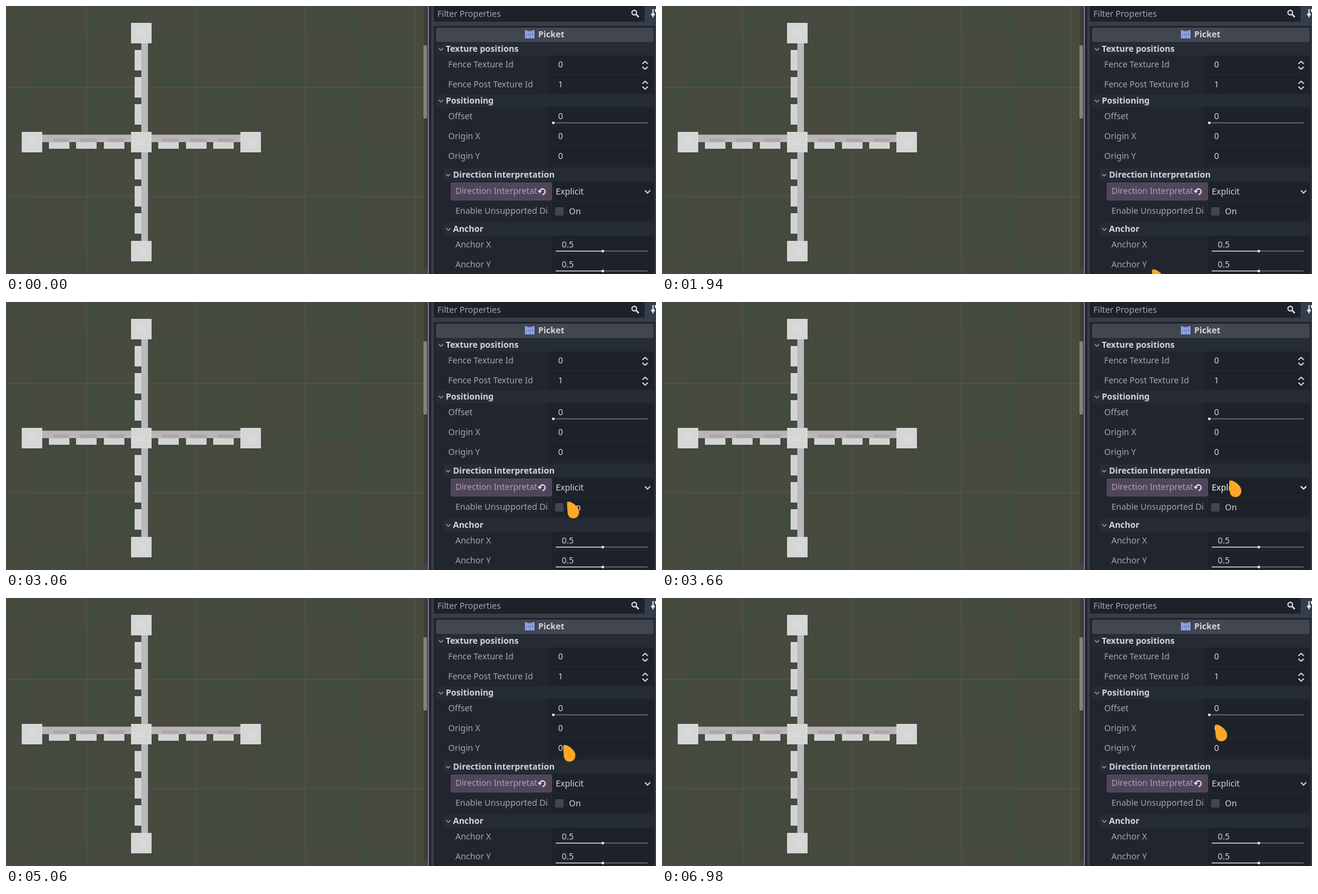
An HTML page that plays this animation: 1076 by 445 pixels, repeating every 8 s.

```html
<!DOCTYPE html>
<html lang="en">
<head>
<meta charset="utf-8">
<title>Inspector</title>
<style>
  html, body { margin: 0; width: 100%; height: 100%; overflow: hidden; background: #21262e; }
  svg { display: block; width: 1076px; height: 445px; }
  text { font: 14px "Noto Sans", sans-serif; white-space: pre; }
  .title { font-weight: 700; fill: #d3d5d8; }
  .label { fill: #a3a6aa; }
  .value { fill: #d0d2d5; }
  path { fill: none; stroke: #d0d2d5; stroke-width: 2; }
  .hover text { fill: #f6f7f8; }
  .hover path { stroke: #f6f7f8; }
</style>
</head>
<body>
<svg id="stage" viewBox="0 0 1076 445"></svg>
<script>
const rect = (x, y, w, h, fill, r = 0) =>
  `<rect x="${x}" y="${y}" width="${w}" height="${h}" rx="${r}" fill="${fill}"/>`;
const text = (x, y, s, kind) => `<text x="${x}" y="${y}" class="${kind}">${s}</text>`;
const path = (d, style = '') => `<path d="${d}" style="${style}"/>`;
const group = (id, body) => `<g id="${id}">${body}</g>`;

function ground() {
  const step = 90.5;
  let s = rect(0, 0, 698, 445, '#484a40');
  for (let i = 0; i < 8; i++)
    for (let j = 0; j < 6; j++)
      if ((i + j) % 2 === 0)
        s += rect(Math.round(i * step - 48), Math.round(j * step - 45.5), 91, 91, '#434a3e');
  for (const x of [133, 314, 495, 676]) s += rect(x, 0, 1, 445, '#55584e');
  for (const y of [135, 316]) s += rect(0, y, 698, 1, '#55584e');
  return s;
}

function fence() {
  let s = '';
  for (const a of [62, 243]) s += rect(224, a, 11, 147, '#b9b9ba');
  for (const a of [60, 241]) {
    s += rect(a, 213, 147, 1, '#75696c') + rect(a, 214, 147, 12, '#bab6b8');
  }
  for (const i of [0, 1, 2, 4, 5, 6]) {
    const x = Math.round(71 + i * 45.3), y = Math.round(73 + i * 45.2);
    s += rect(213, y, 11, 34, '#d3d3d3');
    s += rect(x + 7, 220, 27, 6, '#aca8aa') + rect(x, 226, 34, 11, '#d3d3d3');
  }
  for (const [x, y] of [[207, 28], [26, 209], [207, 209], [388, 209], [207, 390]])
    s += rect(x, y, 34, 34, '#d6d6d6') + rect(x + 11, y + 11, 12, 12, '#dadada');
  return s;
}

const divider = () =>
  rect(692, 0, 5, 437, '#3b4037') + rect(691, 65, 6, 122, '#80847d', 3) +
  rect(697, 0, 4, 445, '#262a33') + rect(698, 0, 2, 445, '#85748f');

const chevron = (x, y, w, h, style) => path(`M${x - w} ${y}l${w} ${h} ${w} ${-h}`, style);

const section = (x, y, s) =>
  rect(x - 16, y - 15, 1088 - x, 21, '#262c35') +
  chevron(x - 8, y - 6, 3.5, 3.5, 'stroke:#9a9da2;stroke-width:1.5') + text(x, y, s, 'title');

const field = (x, y) => rect(x, y - 20, 1072 - x, 30, '#1d2229', 2);

const row = (y, name, value) =>
  field(898, y) + text(732, y, name, 'label') + text(914, y, value, 'value');

const arrows = y => chevron(1058, y - 6, 4.5, -4) + chevron(1058, y - 1, 4.5, 4);

const slider = (x, y, pos) =>
  rect(x, y - 1, 1062 - x, 2, '#5c6068') + rect(x, y - 1, pos - x, 2, '#a6a9ad') +
  rect(pos - 2, y - 2, 4, 4, '#e2e3e5', 1);

const anchor = (y, name) =>
  field(904, y) + text(744, y, name, 'label') + text(920, y, '0.5', 'value') + slider(910, y + 6, 988);

function fenceIcon() {
  let s = rect(860, 43, 14, 2, '#8da5f3') + rect(860, 50, 14, 2, '#8da5f3');
  for (let i = 0; i < 5; i++) {
    const dip = 1.5 - Math.abs(i - 2) * .75;
    s += rect(859 + i * 3.3, 40 + dip, 2.7, 14 - dip, '#8da5f3');
  }
  return s;
}

function inspector() {
  return rect(701, 0, 375, 445, '#21262e') + rect(704, 0, 4, 445, '#363d4a') +
    rect(708, 26, 368, 7, '#363d4a') + rect(1074, 26, 2, 419, '#363d4a') +
    rect(708, 0, 349, 26, '#1d2229') + text(714, 18, 'Filter Properties', 'label') +
    '<circle cx="1040" cy="11" r="3.8" fill="none" stroke="#d8dadd" stroke-width="2"/>' +
    path('M1043 14l4.5 4.5', 'stroke-width:2.5') +
    rect(1057, 0, 19, 26, '#363d4a') + rect(1070, 5, 2, 14, '#e0e0e0') +
    rect(1068, 12, 6, 4, '#e0e0e0', 1) + rect(1074, 5, 2, 5, '#e0e0e0') +

    rect(712, 36, 360, 24, '#42464e', 2) + fenceIcon() + text(881, 52, 'Picket', 'title') +
    section(728, 76, 'Texture positions') +
    row(102, 'Fence Texture Id', 0) + arrows(102) +
    row(135, 'Fence Post Texture Id', 1) + arrows(135) +
    section(728, 162, 'Positioning') +
    row(188, 'Offset', 0) + slider(905, 194, 906) +
    row(221, 'Origin X', 0) +
    row(254, 'Origin Y', 0) +

    section(740, 285, 'Direction interpretation') +
    field(904, 313) + rect(736, 293, 168, 30, '#50465c', 2) +
    text(744, 312, 'Direction Interpretat', 'label') +
    path('M883.5 307.5A4.5 4.5 0 1 1 888 312.8', 'stroke:#e4e4e6') +
    path('M880 306.5h7l-3.5 4.5z', 'fill:#e4e4e6;stroke:none') +
    group('choice', text(910, 313, 'Explicit', 'value') + chevron(1062, 306, 4.5, 4.5)) +
    field(904, 346) + text(744, 345, 'Enable Unsupported Di', 'label') +
    rect(909, 334, 14, 14, '#42464f', 2) +
    group('toggle', text(932, 346, 'On', 'value')) +

    section(740, 375, 'Anchor') + anchor(401, 'Anchor X') + anchor(434, 'Anchor Y');
}

const pointer = group('pointer', path(
  'M2 .3C6 .2 11 3 15 7.2C18.8 11 20.5 14.5 20 19C19.3 24.5 15.5 28 10.5 28' +
  'C5 28 1.2 24 .9 18C.6 12-.2 6 .1 2.2C.2 1 .8 .3 2 .3Z', 'fill:#ffa726;stroke:none'));

const $ = id => document.getElementById(id);
$('stage').innerHTML = ground() + fence() + divider() + inspector() + pointer;

// Pointer stops: time, x, y
const stops = [
  [1940, 811, 437], [2400, 887, 373], [2680, 920, 349], [2760, 920, 349],
  [3520, 942, 304], [3580, 942, 304], [3660, 939, 296], [3900, 931, 281],
  [4360, 926, 268], [4430, 926, 267], [4500, 924, 258], [4620, 924, 255],
  [4880, 924, 255], [5460, 919, 219], [5590, 919, 219], [5620, 919, 218],
  [6000, 919, 214], [6120, 919, 213], [6300, 918, 211], [6820, 918, 211],
  [6980, 915.5, 210], [8000, 915.5, 210]
];

function pointerAt(t) {
  const i = stops.findIndex(stop => stop[0] > t);
  const [t0, x0, y0] = stops[i - 1], [t1, x1, y1] = stops[i];
  const k = (t - t0) / (t1 - t0);
  return [x0 + (x1 - x0) * k, y0 + (y1 - y0) * k];
}

function draw(now) {
  const t = now % 8000, shown = t >= stops[0][0];
  const [x, y] = shown ? pointerAt(t) : [0, 500];
  const over = (top, bottom) => x >= 904 && y >= top && y < bottom;
  $('pointer').setAttribute('transform', `translate(${x} ${y})`);
  $('choice').classList.toggle('hover', over(293, 323));
  $('toggle').classList.toggle('hover', over(326, 356));
}

const start = performance.now();
function tick() {
  draw(performance.now() - start);
  requestAnimationFrame(tick);
}
tick();
</script>
</body>
</html>
```
